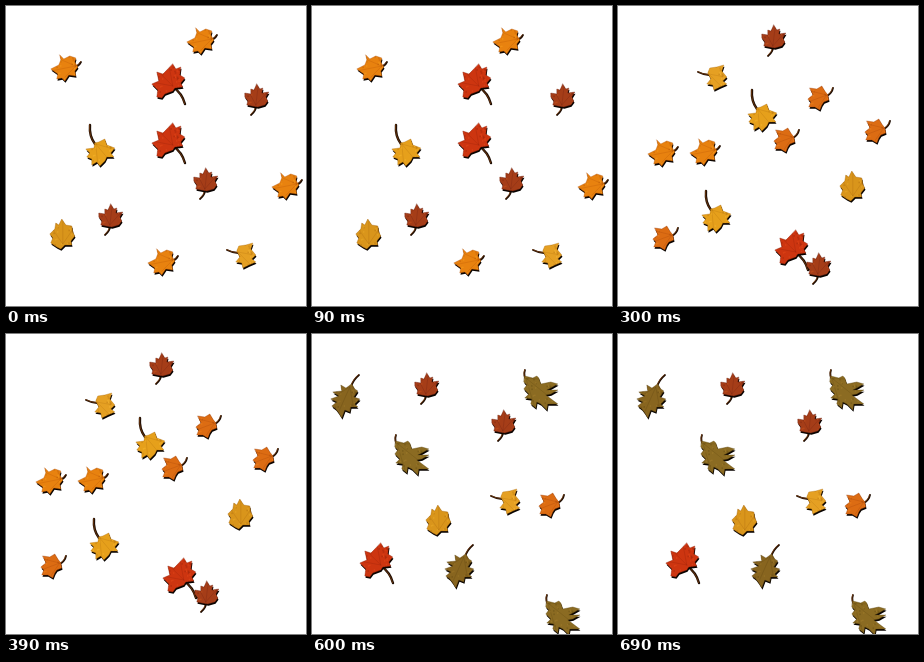
An HTML page with a canvas that plays this animation: 300x300 px, repeating every 0.75 s.

```html
<!DOCTYPE html>
<html lang="en">
<head>
<meta charset="utf-8">
<title>Falling leaves</title>
<style>
html, body { margin: 0; width: 100%; height: 100%; overflow: hidden; background: #fff; }
canvas { display: block; width: 300px; height: 300px; }
</style>
</head>
<body>
<canvas id="stage" width="300" height="300"></canvas>
<script>
const ctx = document.getElementById('stage').getContext('2d');
const STEP = 150;

// Outlines and stems are relative to the middle of each leaf.
const kinds = {
  amber: {
    color: '#e8820f', light: '#ffab24', dark: '#ad4d08', base: [10, -2],
    outline: 'M-6-13 L-2-9 4-12 10-10 9-6 12-1 9 3 10 8 3 7 -1 13 -4 10 -9 11 -8 6 -15 1 -7-3 -5-8Z',
    stem: 'M9-2 Q13-3 15-7'
  },
  scarlet: {
    color: '#cd3510', light: '#ed5420', dark: '#87200a', base: [5, 5],
    outline: 'M5-17 L8-12 13-14 12-6 17-3 13 2 15 6 7 7 5 10 -3 13 -6 17 -11 16 -10 9 -16 3 -9 0 -11-9 -5-7Z',
    stem: 'M5 5 Q14 11 17 22', stemWidth: 2.4
  },
  russet: {
    color: '#a53d18', light: '#d9601f', dark: '#692011', base: [-1, 8],
    outline: 'M0-13 L3-8 6-9 5-4 12-5 9 0 11 4 8 8 1 10 -5 9 -10 8 -9 4 -12 0 -12-4 -6-3 -6-8 -3-7Z',
    stem: 'M-1 8 Q-1 13 -6 17'
  },
  golden: {
    color: '#e6a01b', light: '#ffc238', dark: '#aa680d', base: [-5, -6],
    outline: 'M-6-7 L-2-8 4-11 6-5 14-2 10 3 13 7 6 7 4 11 -1 16 -4 12 -9 15 -9 9 -14 7 -11 3 -15-1 -7-2Z',
    stem: 'M-6-7 Q-12-15 -11-26', stemWidth: 2.4
  },
  honey: {
    color: '#d9951b', light: '#f4b531', dark: '#a0600d', base: [0, 10],
    outline: 'M-1-15 L3-9 9-8 10-2 12 2 8 7 9 11 2 11 -2 15 -6 13 -12 9 -10 4 -13 0 -8-5 -7-11 -4-9Z'
  },
  lemon: {
    color: '#e5a023', light: '#ffc344', dark: '#ae6a10', base: [-4, -4],
    outline: 'M-5-5 L-3-10 4-11 11-13 9-7 14-1 10 3 14 6 7 9 1 12 0 7 -6 6 -2 1Z',
    stem: 'M-4-4 Q-9-4 -15-7'
  },
  oak: {
    color: '#8b6b22', light: '#b18b34', dark: '#5b430f', base: [-15, -12],
    outline: 'M-16-14 L-8-12 -4-14 -2-12 0-6 10-8 17-6 10-2 6 0 17 0 10 4 5 5 17 14 7 14 6 20 0 14 -4 12 -5 18 -10 14 -9 9 -16 8 -12 4 -17-1 -14-5 -17-8Z',
    stem: 'M-14-10 Q-18-15 -16-21'
  },
  bronze: {
    color: '#88651f', light: '#aa8230', dark: '#583e0f', base: [4, -9],
    outline: 'M6-12 L9-7 12-5 8 1 14 3 9 8 12 11 5 11 4 16 -1 14 -4 22 -7 17 -10 13 -14 10 -9 6 -15 3 -7 0 -13-4 -4-5 -5-11 0-8Z',
    stem: 'M5-10 Q7-17 13-22'
  },
  tangerine: {
    color: '#dc6c13', light: '#f98e22', dark: '#9c3e0a', base: [8, -3],
    outline: 'M-9-10 L-2-9 3-12 6-7 9-3 10 2 5 4 3 7 1 12 -4 9 -10 9 -8 4 -11 1 -6-3Z',
    stem: 'M8-3 Q13-6 14-11'
  },
  pumpkin: {
    color: '#ee800f', light: '#ffa526', dark: '#b34c08', base: [12, -4],
    outline: 'M-14 1 L-6-3 -6-12 1-11 10-14 12-5 14-2 12 5 13 10 5 11 3 15 -2 10 -11 9 -8 4Z',
    stem: 'M11-4 L16-5'
  }
};

const scenes = [
  { amber: '196,36 60,63 281,181 157,257', scarlet: '162,76 162,135',
    russet: '251,92 200,176 105,212', golden: '95,145', honey: '57,229', lemon: '236,251' },
  { oak: '121,46 121,216 70,259', russet: '23,70 87,112 234,191', lemon: '64,55 202,67',
    honey: '180,128', scarlet: '59,168', pumpkin: '202,255' },
  { amber: '45,148 87,147', scarlet: '173,242', russet: '156,33 201,261',
    golden: '145,110 99,211', honey: '235,181', lemon: '95,73',
    tangerine: '201,93 258,126 167,135 46,233' },
  { scarlet: '22,33 230,250', russet: '96,37 132,140', honey: '56,87 236,136',
    oak: '168,83', amber: '222,67 155,235', tangerine: '66,156', bronze: '222,192', golden: '61,248' },
  { bronze: '34,63 148,233', russet: '115,53 192,90', oak: '229,57 100,122 251,282',
    honey: '127,187', lemon: '194,169', tangerine: '238,172', scarlet: '64,227' }
];

function seeded(seed) {
  return () => (seed = (seed * 16807) % 2147483647) / 2147483647;
}

function drawStem(path, width = 1.8) {
  ctx.lineCap = 'round';
  ctx.lineWidth = width;
  ctx.strokeStyle = '#1d0d04';
  ctx.stroke(path);
  ctx.lineWidth = 0.7;
  ctx.strokeStyle = '#84430f';
  ctx.save();
  ctx.translate(-0.4, -0.4);
  ctx.stroke(path);
  ctx.restore();
}

function drawLeaf(kind, x, y) {
  const shape = new Path2D(kind.outline);
  const random = seeded(4217);
  ctx.save();
  ctx.translate(x, y);
  if (kind.stem) drawStem(new Path2D(kind.stem), kind.stemWidth);

  ctx.save();
  ctx.translate(0.5, 0.7);
  ctx.fillStyle = '#080300';
  ctx.fill(shape);
  ctx.restore();

  ctx.translate(-0.2, -1);
  ctx.fillStyle = kind.color;
  ctx.fill(shape);
  ctx.save();
  ctx.clip(shape);
  ctx.globalAlpha = 0.35;
  for (let i = 0; i < 70; i++) {
    ctx.fillStyle = random() < 0.5 ? kind.light : kind.dark;
    ctx.fillRect(random() * 36 - 18, random() * 40 - 20, 1.5, 1.5);
  }
  ctx.lineWidth = 0.7;
  ctx.strokeStyle = kind.dark;
  const [bx, by] = kind.base;
  const heading = Math.atan2(-by, -bx);
  for (const spread of [-0.6, 0, 0.6]) {
    ctx.beginPath();
    ctx.moveTo(bx, by);
    ctx.lineTo(bx + 30 * Math.cos(heading + spread), by + 30 * Math.sin(heading + spread));
    ctx.stroke();
  }
  ctx.restore();
  ctx.globalAlpha = 0.6;
  ctx.lineWidth = 0.6;
  ctx.strokeStyle = kind.dark;
  ctx.stroke(shape);
  ctx.restore();
}

function drawScene(scene) {
  ctx.fillStyle = '#fff';
  ctx.fillRect(0, 0, 300, 300);
  for (const [name, places] of Object.entries(scene)) {
    for (const place of places.split(' ')) {
      drawLeaf(kinds[name], ...place.split(',').map(Number));
    }
  }
}

const start = performance.now();
let shown = -1;
function tick() {
  const index = Math.floor((performance.now() - start) / STEP) % scenes.length;
  if (index !== shown) drawScene(scenes[shown = index]);
  requestAnimationFrame(tick);
}
tick();
</script>
</body>
</html>
```
